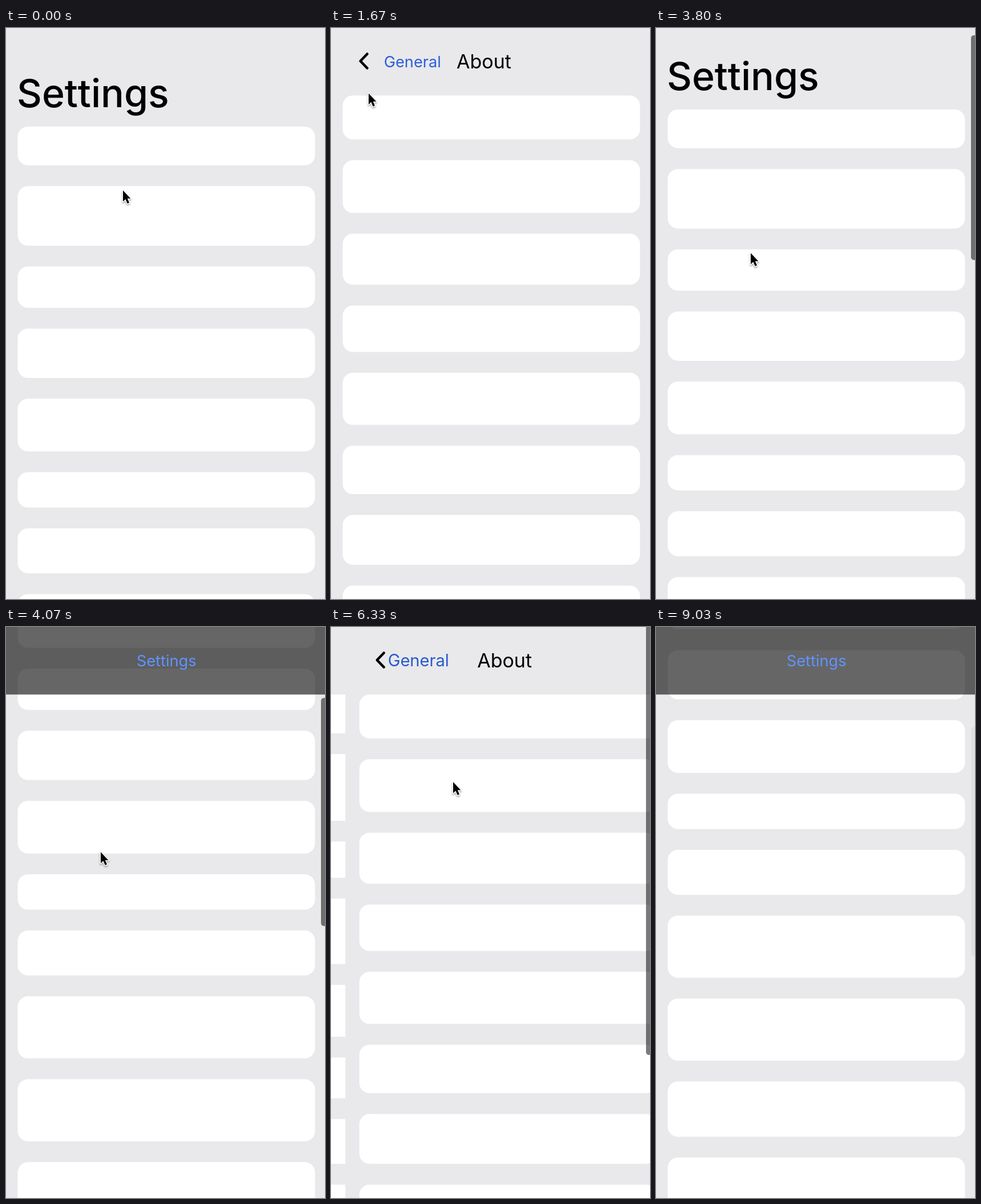
Write an HTML page that moves like this. It is 559x1002 px and loops after 9160 ms.

```html
<!DOCTYPE html>
<html lang="en">
<head>
<meta charset="utf-8">
<title>Settings navigation</title>
<style>
  html, body { margin: 0; width: 100%; height: 100%; overflow: hidden; background: #e9e9eb; }
  svg { display: block; width: 100%; height: 100%; font-family: Inter, Roboto, sans-serif; }
  .page-bg { fill: #e9e9eb; }
  .card { fill: #fff; }
  .chevron { fill: none; stroke: #000; stroke-width: 4.5; stroke-linecap: round; stroke-linejoin: round; }
  #cursor { filter: drop-shadow(0 2px 1.5px rgba(0, 0, 0, .35)); }
  #cursor path { stroke: #fff; stroke-width: 3; stroke-linejoin: round; paint-order: stroke; }
</style>
</head>
<body>
<svg id="stage" viewBox="0 0 559 1002"></svg>
<script>
const LOOP = 9160, WIDTH = 559, HEIGHT = 1002, GAP = 36.5;
const LABEL = { x: 92.7, y: 68.6, size: 27.2, color: [44, 94, 219] };
const BLACK = [0, 0, 0], LIGHT = [97, 147, 254];
const LARGE_TITLE = { x: 19, y: 139, size: 68, color: BLACK };
const BAR_TITLE = { x: 226.4, y: 68.6, size: 27.2, color: LIGHT };
const PAGE_TITLE = { x: 226.4, y: 71.1, size: 34, color: BLACK };

const screens = [
  { title: 'Settings', top: 173, cards: [68, 104.5, 72.5, 86.5, 92.5, 62, 79, 109, 109, 97, 110] },
  { title: 'General', titleX: 226.4, back: 'Settings', em: 3.915, top: 118.5,
    cards: [68, 117, 63.5, 115, 91, 71.5, 78.5, 90] },
  { title: 'About', titleX: 220, back: 'General', em: 3.664, top: 118.5,
    cards: [77, 92.5, 89.5, 81.5, 91.5, 85, 87.5, 90] }
];

// start, page on top, direction (1 push, -1 pop), duration
const moves = [
  [10, 1, 1, 600], [750, 2, 1, 600], [2050, 2, -1, 600], [2870, 1, -1, 600],
  [5041, 1, 1, 600], [5901, 2, 1, 600], [6730, 2, -1, 600], [8050, 1, -1, 1]
];
const scrollKeys = [[3690, 0], [3800, 29], [3900, 140], [4050, 330], [4200, 440], [4430, 487]];
const fadeKeys = [[8700, .52], [9030, .04]];
const cursorKeys = [
  [0, 205, 285], [1300, 200, 275], [1670, 66, 115], [1840, 57, 62], [2870, 57, 62],
  [3470, 166, 395], [4570, 166, 395], [5040, 247, 217], [5300, 247, 217],
  [5850, 214, 272], [6400, 214, 272], [6720, 57, 64], [7930, 57, 62],
  [8060, 57, 62], [8290, 180, 200], [8900, 330, -35]
];

const clamp = v => Math.min(1, Math.max(0, v));
const lerp = (a, b, k) => a + (b - a) * k;
const mix = (a, b, k) => `rgb(${a.map((v, i) => Math.round(lerp(v, b[i], k)))})`;

function sample(keys, t) {
  if (t <= keys[0][0]) return keys[0].slice(1);
  const i = keys.findIndex(key => key[0] > t);
  if (i < 0) return keys[keys.length - 1].slice(1);
  const [a, b] = [keys[i - 1], keys[i]];
  return a.slice(1).map((v, n) => lerp(v, b[n + 1], (t - a[0]) / (b[0] - a[0])));
}

// cubic-bezier(.25, .1, .25, 1)
function ease(x) {
  if (x <= 0 || x >= 1) return clamp(x);
  let lo = 0, hi = 1;
  for (let i = 0; i < 24; i++) {
    const s = (lo + hi) / 2, r = 1 - s;
    if (.75 * r * s + s ** 3 < x) lo = s; else hi = s;
  }
  const r = 1 - lo;
  return .3 * r * r * lo + 3 * r * lo * lo + lo ** 3;
}

function set(node, attrs) {
  for (const name in attrs) node.setAttribute(name, attrs[name]);
  return node;
}
function add(parent, tag, attrs = {}, text = '') {
  const node = set(document.createElementNS('http://www.w3.org/2000/svg', tag), attrs);
  node.textContent = text;
  return parent.appendChild(node);
}
const addText = (parent, text, style, attrs) => add(parent, 'text', {
  x: style.x, y: style.y, 'font-size': style.size, fill: mix(style.color, BLACK, 0), ...attrs
}, text);
const show = (node, visible) => set(node, { visibility: visible ? 'inherit' : 'hidden' });
const place = (node, x, y) => set(node, { transform: `translate(${x} ${y})` });

const stage = document.getElementById('stage');

const pages = screens.map((screen, depth) => {
  const group = add(stage, 'g');
  add(group, 'rect', { class: 'page-bg', x: -4, y: 0, width: WIDTH + 8, height: HEIGHT });
  const list = add(group, 'g');
  let y = screen.top;
  for (const height of screen.cards) {
    add(list, 'rect', { class: 'card', x: 20.5, y, width: 521, height, rx: 18 });
    y += height + GAP;
  }
  if (!depth) {
    const title = addText(list, screen.title, LARGE_TITLE, { 'font-weight': 500 });
    const bar = add(group, 'g');
    add(bar, 'rect', { width: WIDTH, height: 118.5, fill: '#000', 'fill-opacity': .6 });
    addText(bar, screen.title, { ...BAR_TITLE, x: 228.8 });
    return { group, list, title, bar };
  }
  add(group, 'path', { class: 'chevron', d: 'M63.5 45.5L51.5 58L63.5 70.5' });
  const label = addText(group, screen.back, LABEL);
  const title = addText(group, screen.title, { ...PAGE_TITLE, x: screen.titleX });
  return { group, list, title, label };
});

const thumb = add(stage, 'rect', { x: 552, width: 14, rx: 5 });
const cursor = add(stage, 'g', { id: 'cursor' });
add(cursor, 'path', { d: 'M0 0V19.5L4.4 15.4L7.7 23L11 21.6L7.8 14.2H13.4Z' });

function drawLabel(depth, p, tau, pageX, scrolled) {
  const { label, title } = pages[depth], { em, titleX } = screens[depth];
  const from = depth > 1 ? PAGE_TITLE : scrolled ? BAR_TITLE : LARGE_TITLE;
  const size = lerp(from.size, LABEL.size, tau);
  set(label, {
    x: lerp(from.x, LABEL.x, p) - pageX,
    y: lerp(from.y, LABEL.y, p),
    'font-size': size,
    fill: mix(from.color, LABEL.color, p)
  });
  set(title, { x: titleX + (size - LABEL.size) * em });
}

function drawScrollbar(t, scroll, settingsShown) {
  const top = scroll ? 2 + scroll * .355 : 0;
  const bottom = settingsShown ? top + 394 + scroll * .018 : 751;
  // Extends past the stage top when the page rests at its start.
  const y = scroll ? top : -3;
  set(thumb, { y, height: bottom - y, 'fill-opacity': t < 3700 ? 0 : sample(fadeKeys, t)[0] });
}

function render(t) {
  const [start, over, dir, duration] = moves.filter(move => move[0] <= t).pop() || [0, 1, -1, 1];
  const raw = t < moves[0][0] ? 1 : clamp((t - start) / duration);
  const tau = dir > 0 ? raw : 1 - raw;
  const p = dir > 0 ? ease(raw) : 1 - ease(raw);
  const moving = p > 0 && p < 1;
  const pageX = WIDTH * (1 - p);
  const scroll = t < 5041 || t >= 8050 ? sample(scrollKeys, t)[0] : 0;

  pages.forEach(({ group, title }, depth) => {
    show(group, depth === over ? p > 0 : depth === over - 1 && p < 1);
    show(title, !(moving && depth === over - 1));
    place(group, depth === over ? pageX : dir > 0 ? -335 * p : 0, 0);
    if (depth && depth !== over) drawLabel(depth, 1, 1, 0, false);
  });
  drawLabel(over, p, tau, pageX, t > 4430);

  place(pages[0].list, 0, -scroll);
  set(pages[0].bar, { opacity: clamp((scroll - 60) / 80) });
  drawScrollbar(t, scroll, over === 1 && p < 1);
  place(cursor, ...sample(cursorKeys, t));
}

function tick() {
  render(performance.now() % LOOP);
  requestAnimationFrame(tick);
}
tick();
</script>
</body>
</html>
```
